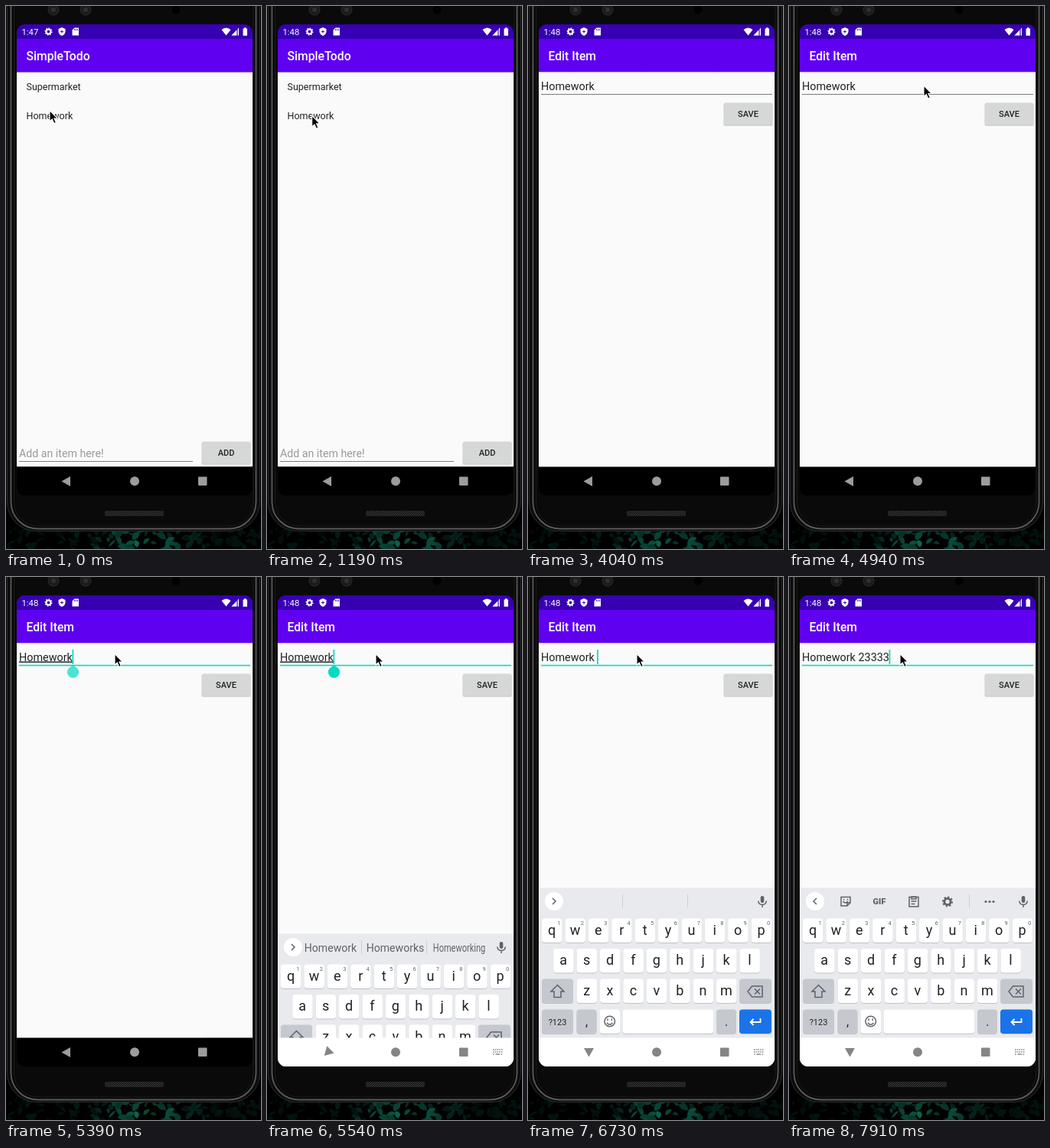
Animation of 333 by 710 pixels, one loop 8000 ms. Source, as an HTML page:

```html
<!DOCTYPE html>
<html lang="en">
<head>
<meta charset="utf-8">
<title>Todo app demo</title>
<style>
html, body { margin: 0; width: 100%; height: 100%; overflow: hidden; background: #000; }
svg { display: block; width: 100%; height: 100%; }
text { font-family: Roboto, "Open Sans", sans-serif; white-space: pre; fill: #212121; }
.title { font-size: 15.7px; font-weight: 500; fill: #fff; }
.item { font-size: 12.5px; }
.field { font-size: 14.4px; }
.button { font-size: 11px; font-weight: 500; text-anchor: middle; }
.word { font-size: 14.1px; text-anchor: middle; fill: #5f6368; }
.key { font-size: 18px; text-anchor: middle; }
.hint { font-size: 7.5px; text-anchor: middle; fill: #5f6368; }
.line { fill: none; stroke: #5f6368; stroke-width: 1.5; }
</style>
</head>
<body>
<svg viewBox="0 0 333 710">
  <defs>
    <clipPath id="screen"><rect x="14" y="24" width="308" height="616" rx="11"/></clipPath>
    <linearGradient id="shade" x2="0" y2="1">
      <stop stop-opacity=".07"/><stop offset="1" stop-opacity="0"/>
    </linearGradient>
    <pattern id="mesh" width="3" height="3" patternUnits="userSpaceOnUse">
      <rect width="3" height="3" fill="#191919"/><path d="M0 3L3 0" stroke="#3a3a3a"/>
    </pattern>
  </defs>

  <rect width="333" height="710"/>
  <g id="leaves"></g>

  <!-- phone -->
  <rect x="1.5" y="-50" width="330" height="736.5" rx="38" fill="#0c0c0c" stroke="#2e2e2e"/>
  <rect x="6.5" y="-50" width="320" height="733.5" rx="35" fill="#070707" stroke="#5a5a5a" stroke-width="1.8"/>
  <rect x="10.5" y="-50" width="312.5" height="730" rx="31" fill="#0a0a0a" stroke="#1d1d1d"/>
  <g fill="#1b1b1b" stroke="#2c2c2c"><circle cx="62" cy="5" r="7"/><circle cx="104" cy="5" r="7"/></g>
  <g fill="#303030"><circle cx="62" cy="5" r="3"/><circle cx="104" cy="5" r="3"/></g>
  <circle cx="222" cy="5" r="5.5" fill="#000"/>
  <rect x="129" y="660" width="77" height="7" rx="2" fill="url(#mesh)"/>

  <g clip-path="url(#screen)">
    <g id="list"></g>
    <g id="edit"></g>
    <g id="keyboard"></g>
    <g id="status"></g>
    <g id="nav">
      <path id="back" d="M72.5 621.5L84 615V628Z"/>
      <circle cx="168" cy="621.3" r="6"/>
      <rect x="251" y="615.5" width="11.5" height="11.5" rx="1"/>
    </g>
  </g>
  <path id="pointer" d="M0 0V14.5L3.3 11.5L5.7 17L8.3 15.9L5.9 10.5H10.3Z" stroke="#fff" stroke-width="1.1"/>
</svg>
<script>
const $ = id => document.getElementById(id);
const rect = (x, y, w, h, fill, r = 0) =>
  `<rect x="${x}" y="${y}" width="${w}" height="${h}" rx="${r}" fill="${fill}"/>`;
const text = (cls, x, y, s, more = '') => `<text class="${cls}" x="${x}" y="${y}" ${more}>${s}</text>`;
const line = (d, more = '') => `<path class="line" d="${d}" ${more}/>`;
const gear = (x, y, r, color) => `<g fill="none" stroke="${color}">
  <circle cx="${x}" cy="${y}" r="${r * .58}" stroke-width="${r * .4}"/>
  <circle cx="${x}" cy="${y}" r="${r * .86}" stroke-width="${r * .3}" pathLength="16" stroke-dasharray="1"/></g>`;

// wallpaper: leaf shards, brightest below the middle of the phone
let seed = 7;
const random = () => (seed = seed * 16807 % 2147483647) / 2147483647;
$('leaves').innerHTML = Array.from({ length: 110 }, () => {
  const x = random() * 333, y = 684 + random() * 26, w = 6 + random() * 10, h = 4 + random() * 8;
  const glow = (.2 + .8 * Math.exp(-(((x - 175) / 55) ** 2))) * (.35 + .65 * random());
  return `<path d="M0 0Q${w / 2} ${-h} ${w} 0Q${w / 2} ${h / 2} 0 0" fill="rgb(${12 * glow},${105 * glow},${82 * glow})"
    transform="translate(${x} ${y}) rotate(${(random() - .5) * 160})"/>`;
}).join('');

const page = title =>
  rect(14, 24, 308, 19, '#3700b3') + rect(14, 43, 308, 43.5, '#6000f0') +
  rect(14, 86.5, 308, 516, '#fafafa') + rect(14, 86.5, 308, 3, 'url(#shade)') +
  rect(14, 602.5, 308, 40, '#000') + text('title', 26.5, 71, title);
const button = (y, label) =>
  rect(255.5, y + .8, 64, 29.5, '#00000030', 2) + rect(256, y, 63, 29, '#d6d7d7', 2) +
  text('button', 287.5, y + 18.5, label);

$('list').innerHTML = page('SimpleTodo') +
  text('item', 26.5, 110, 'Supermarket') + text('item', 26.5, 148, 'Homework') +
  text('field', 17, 590, 'Add an item here!', 'style="fill:#9a9a9a;font-size:14.2px"') +
  rect(17, 595, 227, 1, '#7d7d7d') + button(569.5, 'ADD');

$('edit').innerHTML = page('Edit Item') + text('field', 17, 109.5, '', 'id="entry"') +
  '<rect id="rule" x="17" width="302"/>' + button(126.5, 'SAVE') +
  '<rect id="caret" y="95" width="1.7" height="19" fill="#03dac5"/>' +
  '<path id="handle" d="M87.5 115L93 119.2A7.6 7.6 0 1 1 82 119.2Z" fill="#03dac5"/>';

$('status').innerHTML = text('', 20.5, 37.7, '', 'id="clock" style="fill:#fff;font-size:11.3px"') +
  gear(55.5, 33.5, 5, '#fff') +
  `<g fill="#fff"><path d="M73 28L77.5 30V33.5Q77 37.5 73 39Q69 37.5 68.5 33.5V30Z"/>
  <path d="M89.5 28.5H95V38.5H86.5V31.5Z"/>
  <path d="M281.5 31Q287.5 26 293.5 31L287.5 38.5Z"/><path d="M304 28.5V38.5H294.5Z" fill-opacity=".4"/>
  <path d="M301 31.7V38.5H294.5ZM303 29.5L304 28.5V38.5H303Z"/>
  <path d="M309.5 29.5H311V28.3H313.5V29.5H315V38.8H309.5Z"/></g>
  <path d="M71 33.5H75M73 31.5V35.5" stroke="#3700b3"/>
  <path d="M89.5 30V32M91.5 30V32M93.5 30V32" stroke="#3700b3" stroke-width=".9"/>`;

// keyboard
const cap = (x, y, w, fill = '#fff') =>
  rect(x, y + 1, w, 31.5, '#bfc2c7', 4) + rect(x, y, w, 31.5, fill, 4);
const row = (letters, x0, y) => [...letters].map((c, i) => {
  const x = x0 + 30.4 * i;
  return cap(x - 13, y, 26.5) + text('key', x, y + 21, c);
}).join('');
const grey = '#c5c9cf';
const divider = x => rect(x, 415, 1, 18, '#cdd0d4');

const keys = rect(14, 406.5, 308, 240, '#e8eaed') +
  row('qwertyuiop', 31, 446.5) + row('asdfghjkl', 46.2, 486) + row('zxcvbnm', 76.6, 525.5) +
  [...'1234567890'].map((d, i) => text('hint', 40.5 + 30.4 * i, 455, d)).join('') +
  cap(18, 525.5, 41, grey) + cap(276, 525.5, 42, grey) +
  cap(18, 565.5, 41, grey) + cap(63.5, 565.5, 26, grey) + cap(93.5, 565.5, 26.5) +
  cap(123.5, 565.5, 118.5) + cap(246, 565.5, 26, grey) + cap(276, 565.5, 42, '#1a73e8') +
  text('key', 38.5, 585.5, '?123', 'style="font-size:11px"') +
  text('key', 76.5, 587, ',', 'style="font-size:16px"') + text('key', 259, 587, '.', 'style="font-size:16px"') +
  line('M38.5 533.5L47 542H43V549.5H34V542H30Z') +
  line('M287 542L292.5 535H306V549H292.5ZM296 538.5L303 545.5M303 538.5L296 545.5') +
  '<circle class="line" cx="106.7" cy="581" r="6.8"/>' + line('M103 583Q106.7 587.5 110.4 583M104 577.5V580M109.3 577.5V580') +
  line('M303.5 577V582H290.5M294.5 578L290.5 582L294.5 586', 'style="stroke:#fff;stroke-width:1.8"');

const bar = '<circle cx="34" cy="424" r="12" fill="#fff"/><path id="chevron" class="line"/>' +
  rect(303.7, 417, 4.6, 9, '#5f6368', 2.3) + line('M300.8 423.5Q301 428.5 306 428.5T311.2 423.5M306 428.5V432') +
  `<g id="dividers">${divider(123)}${divider(208)}</g><g id="words">` +
  text('word', 83, 430, 'Homework') + text('word', 167.5, 430, 'Homeworks') +
  text('word', 0, 0, 'Homeworking', 'transform="translate(251 430) scale(.78 1)"') + '</g>' +
  '<g id="tools">' + line('M68 418.5H80V426L76 430H68ZM80 426H76V430M70.5 424Q73.5 428 77 424M71.5 421V422.5M76.5 421V422.5') +
  text('word', 118, 428, 'GIF', 'style="font-size:11px;font-weight:900"') +
  line('M157 418.5H169V431H157ZM160 418V421H166V418ZM159.5 424H166.5M159.5 427.5H164.5') +
  gear(207, 424.5, 7, '#5f6368') + divider(235) +
  [257, 262, 267].map(x => `<circle cx="${x}" cy="424.5" r="1.6" fill="#5f6368"/>`).join('') + '</g>';

$('keyboard').innerHTML = `<g id="panel">${keys}${bar}</g>` + rect(14, 602.5, 308, 40, '#fff') +
  line('M295 618H307.5M295 621H307.5M295 624H297M305.5 624H307.5', 'stroke-dasharray="1.6 1.1" style="stroke:#888"') +
  line('M298.5 624H304', 'style="stroke:#888"');

// value of the last [time, value] step reached
const at = (t, ...steps) => steps.filter(s => t >= s[0]).pop()[1];
const show = (id, opacity) => $(id).setAttribute('opacity', +opacity);
const zoom = (id, s, cy) => $(id).setAttribute('transform', `translate(168 ${cy}) scale(${s}) translate(-168 ${-cy})`);

function draw(t) {
  $('clock').textContent = t < 600 ? '1:47' : '1:48';

  const p = at(t, [0, [57, 136.5]], [1050, [58, 140]], [1190, [58.7, 143.3]], [3890, [58.7, 144]], [4040, null],
    [4640, [322, 146]], [4790, [250, 118]], [4940, [176, 104]], [5090, [142, 100.5]],
    [7620, [143, 100.5]], [7770, [145, 100.5]]);
  show('pointer', !!p);
  if (p) $('pointer').setAttribute('transform', `translate(${p})`);

  // page change
  show('edit', t >= 3140);
  zoom('list', at(t, [0, 1], [3140, 1.044]), 325);
  zoom('edit', at(t, [0, .984], [3290, .996], [3440, 1]), 352);

  // text field
  const focused = t >= 5390, open = t >= 5540;
  const entry = $('entry');
  entry.textContent = 'Homework' + at(t, [0, ''], [6430, ' '], [7170, ' 2'], [7320, ' 23'],
    [7620, ' 233'], [7770, ' 2333'], [7910, ' 23333']);
  entry.style.textDecoration = focused && t < 6430 ? 'underline' : 'none';
  const rule = $('rule');
  rule.setAttribute('y', focused ? 114.8 : 115);
  rule.setAttribute('height', focused ? 1.6 : 1);
  rule.setAttribute('fill', focused ? '#03dac5' : '#7d7d7d');
  $('caret').setAttribute('x', 16.6 + entry.getComputedTextLength());
  show('caret', focused && !(t >= 5990 && t < 6430));
  show('handle', at(t, [0, 0], [5390, .7], [5540, 1], [6430, 0]));

  // keyboard and navigation bar
  show('keyboard', open);
  $('panel').setAttribute('transform', `translate(0 ${at(t, [0, 60], [5690, 0])})`);
  $('nav').setAttribute('fill', open ? '#858585' : '#9c9c9c');
  $('back').setAttribute('transform', `rotate(${at(t, [0, 0], [5540, -45], [5690, -80], [5840, -90])} 79 621)`);
  show('words', at(t, [0, 1], [6430, .6], [6580, .2], [6730, 0]));
  show('dividers', t < 7170);
  show('tools', at(t, [0, 0], [7170, .6], [7320, 1]));
  $('chevron').setAttribute('d', t < 7170 ? 'M32 420L36 424L32 428' : 'M36 420L32 424L36 428');
}

function tick(now) {
  draw(now % 8000);
  requestAnimationFrame(tick);
}
draw(0);
requestAnimationFrame(tick);
</script>
</body>
</html>
```
